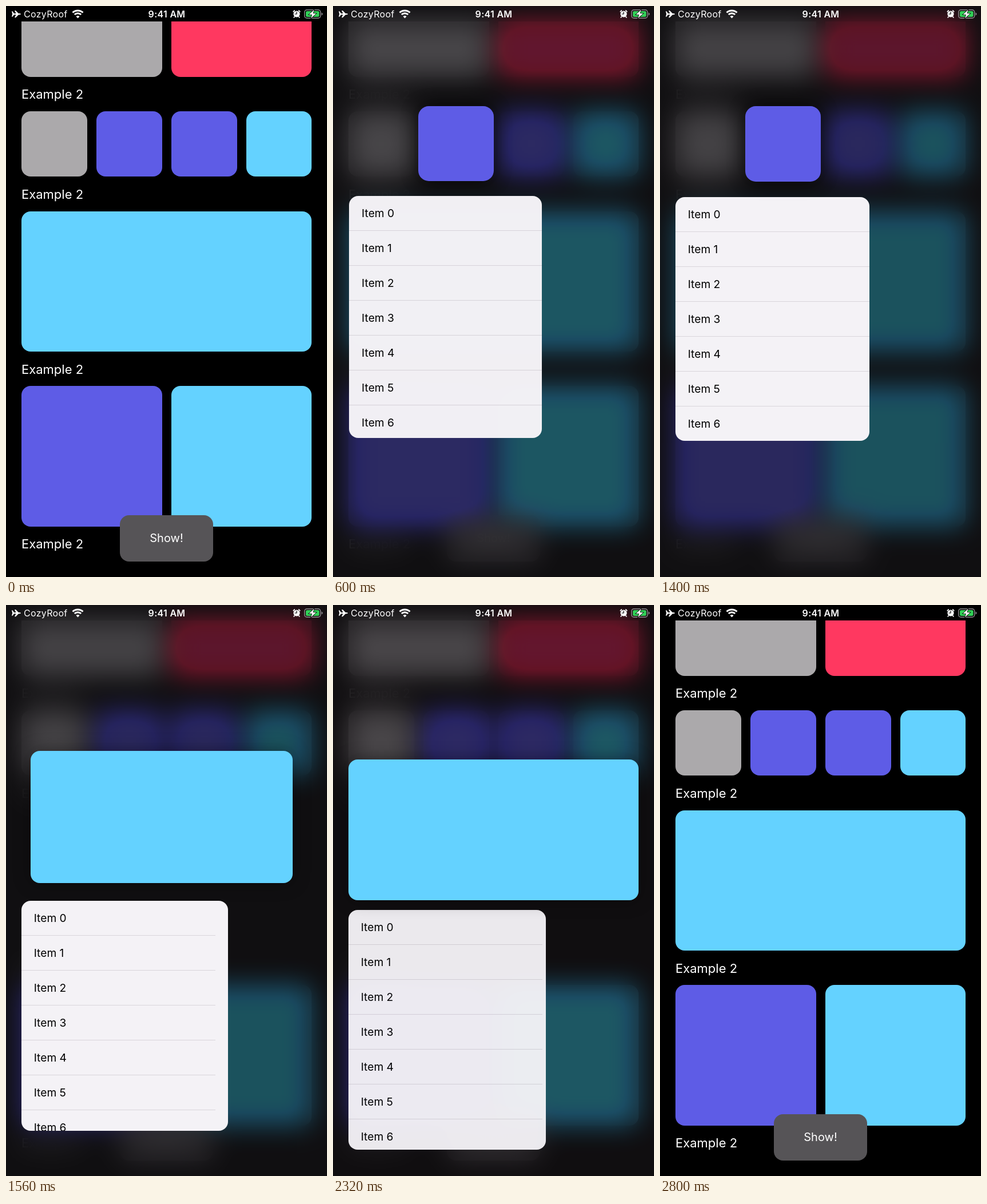
An HTML page for the animation above (2.84 s loop, 561x998 px).

```html
<!DOCTYPE html>
<html lang="en">
<head>
<meta charset="utf-8">
<title>Context menu</title>
<style>
  html, body { margin: 0; width: 100%; height: 100%; overflow: hidden; background: #000; }
  #stage { position: relative; width: 561px; height: 998px; overflow: hidden; background: #000; font-family: Inter, "Open Sans", sans-serif; color: #fff; }
  #stage div { position: absolute; box-sizing: border-box; white-space: nowrap; }
  #scene, #haze, #tint { inset: 0; }
  #scene { background: #000; }
  .tile { border-radius: 16px; }
  .label { left: 27px; font-size: 22px; line-height: 30px; }
  .button { left: 199px; top: 889.5px; width: 163px; height: 81.5px; border-radius: 16px; background: #565457; font-size: 20px; line-height: 81px; text-align: center; }
  .bar { left: 0; top: 0; width: 561px; height: 27px; background: #000; }
  #haze { backdrop-filter: blur(23px) saturate(1.7); }
  #tint { background: rgba(24, 22, 25, .7); }
  #menu { border-radius: 16px; background: #f4f2f6; color: #000; font-size: 19.2px; }
  .item { left: 0; width: 339px; height: 61px; padding-left: 21.7px; line-height: 60px; }
  .item:not(:last-child) { border-bottom: 1px solid rgba(60, 50, 70, .15); }
  #status { position: absolute; left: 0; top: 0; }
  #status text { fill: #fff; font-size: 16px; letter-spacing: .3px; }
</style>
</head>
<body>
<div id="stage">
  <div id="scene"></div>
  <div id="haze"></div>
  <div id="tint"></div>
  <div id="menu"></div>
  <div id="preview"></div>
  <svg id="status" width="561" height="28">
    <path fill="#fff" transform="translate(0 2.800) scale(1 .8)" d="M10 8h1.500l2.500 4.600h3.500L15 6.500h2l5 6.100h2q2 .5 2 1.500t-2 1.500h-2l-5 6.100h-2l2.500-6.100H14L11.500 20H10l1.200-5.900z"/>
    <text x="31" y="20">CozyRoof</text>
    <g fill="none" stroke="#fff" stroke-width="3">
      <path d="M116.500 11.500a13 13 0 0 1 18 0M119.800 15a8.200 8.200 0 0 1 11.400 0"/>
    </g>
    <path fill="#fff" d="M125.500 21.500l-3-3.200a4.200 4.200 0 0 1 6 0z"/>
    <text x="281" y="20" text-anchor="middle" font-weight="600">9:41 AM</text>
    <g stroke="#fff" stroke-linecap="round" fill="none">
      <circle cx="508" cy="14" r="5.600" fill="#fff" stroke="none"/>
      <path stroke-width="1.700" d="M502.300 9.800l2-2M513.700 9.800l-2-2M504 19l-.8 1M512 19l.8 1"/>
      <path stroke="#000" stroke-width="1.200" d="M508 10.500V14h-3"/>
    </g>
    <rect x="521.700" y="6.700" width="28" height="14.600" rx="4.200" fill="none" stroke="#8e8e90" stroke-width="1.400"/>
    <rect x="524" y="9" width="23.500" height="10" rx="2.200" fill="#32d158"/>
    <path fill="#8e8e90" d="M551.500 11.500q2 .6 2 2.500t-2 2.500z"/>
    <path fill="#fff" stroke="#000" stroke-width="1.500" paint-order="stroke" d="M538.500 6.500L529.500 15h5.500l-2 6.500L542 13h-5.500z"/>
  </svg>
</div>
<script>
const LOOP = 2840, OPEN = 312, SWITCH = 1403, CLOSE = 2271, CLOSE_TIME = 430;
const GRAY = '#aba9ab', RED = '#ff3860', PURPLE = '#5e5ce6', CYAN = '#64d2ff';
const $ = id => document.getElementById(id);

// Rectangles are [left, top, width, height]
const smallTile = [158, 183.5, 114.5, 114.5], wideTile = [27, 358.5, 507, 245.5];
const smallLifted = [149.4, 174.9, 131.7, 131.7], wideLifted = [27, 267, 507, 245.5];
const upperMenu = [27, 334, 339, 426], lowerMenu = [27, 540, 339, 426];
const tiles = [
  [GRAY, [27, 0, 245.5, 123.5]], [RED, [288.5, 0, 245.5, 123.5]],
  [GRAY, [27, 183.5, 114.5, 114.5]], [PURPLE, smallTile, 'small'],
  [PURPLE, [289, 183.5, 114.5, 114.5]], [CYAN, [419.5, 183.5, 114.5, 114.5]],
  [CYAN, wideTile, 'wide'],
  [PURPLE, [27, 664, 245.5, 245.5]], [CYAN, [288.5, 664, 245.5, 245.5]],
];

function place(el, [x, y, w, h]) {
  Object.assign(el.style, { left: x + 'px', top: y + 'px', width: w + 'px', height: h + 'px' });
}

for (const [color, rect, id = ''] of tiles) {
  const tile = document.createElement('div');
  tile.className = 'tile';
  tile.id = id;
  tile.style.background = color;
  place(tile, rect);
  $('scene').append(tile);
}
$('scene').insertAdjacentHTML('beforeend',
  [154, 329, 634.5, 940].map(y => `<div class="label" style="top:${y - 15}px">Example 2</div>`).join('') +
  '<div class="button">Show!</div><div class="bar"></div>');
for (let i = 0; i < 7; i++)
  $('menu').insertAdjacentHTML('beforeend', `<div class="item" style="top:${i * 61}px">Item ${i}</div>`);

const mix = (a, b, k) => a.map((v, i) => v + (b[i] - v) * k);
const smooth = u => (u = Math.min(1, Math.max(0, u)), u * u * (3 - 2 * u));
const spring = ms => {
  const x = Math.max(0, ms) * .0226;
  return 1 - (1 + x) * Math.exp(-x);
};
const show = (id, on) => $(id).style.visibility = on ? 'visible' : 'hidden';

function render(t) {
  const switched = t >= SWITCH;
  const active = t >= OPEN && t < CLOSE + CLOSE_TIME;
  const closing = smooth((t - CLOSE) / CLOSE_TIME);
  const opening = spring(t - OPEN), moving = spring(t - SWITCH);
  const haze = smooth((t - OPEN) / 320) * (1 - closing);
  const menu = $('menu'), preview = $('preview');

  show('small', !active || switched);
  show('wide', !active || !switched);
  show('menu', active);
  show('preview', active);
  $('haze').style.opacity = $('tint').style.opacity = haze;

  let box, list;
  if (switched) {
    box = mix(mix(smallLifted, wideLifted, moving), wideTile, closing);
    list = mix(mix(wideTile, lowerMenu, moving), wideTile, closing);
  } else {
    box = mix(smallTile, smallLifted, opening);
    list = mix(smallTile, upperMenu, opening);
  }
  place(preview, box);
  place(menu, list);
  preview.style.background = switched ? CYAN : PURPLE;
  preview.style.borderRadius = (switched ? 16 : 16 * box[2] / smallTile[2]) + 'px';
  preview.style.boxShadow = `0 0 30px rgba(0,0,0,${.4 * haze})`;
  menu.style.opacity = switched ? 1 - closing : opening;
  menu.style.overflow = switched && !closing ? 'hidden' : 'visible';
}

function tick() {
  render(performance.now() % LOOP);
  requestAnimationFrame(tick);
}
tick();
</script>
</body>
</html>
```
